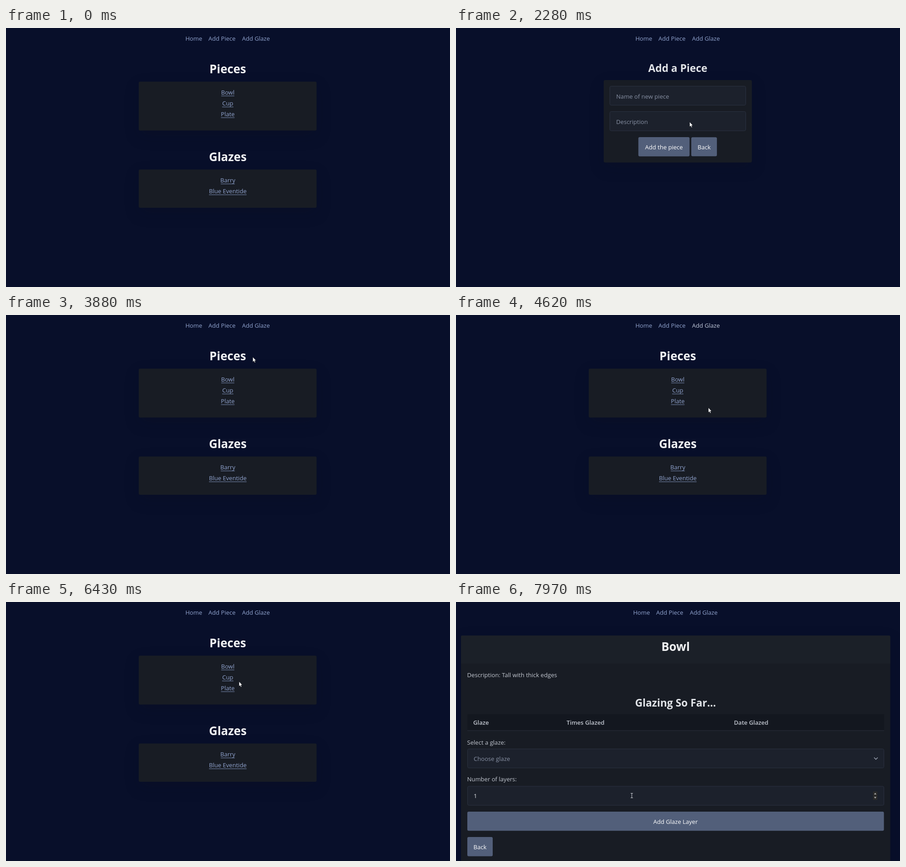
An HTML page that plays this animation: 980x572 px, repeating every 8 s.

```html
<!DOCTYPE html>
<html lang="en">
<head>
<meta charset="utf-8">
<title>Glaze tracker</title>
<style>
html, body { margin: 0; width: 100%; height: 100%; overflow: hidden; background: #080f2a; }
svg { display: block; width: 980px; height: 572px; }
text { font: 13.1px "Open Sans", "Noto Sans", sans-serif; fill: #c2c7d0; }
.mid text, text.mid { text-anchor: middle; }
.link { fill: #91a4cf; transition: fill .15s; }
.link.lit { fill: #c3cbdd; }
.u { stroke: #7f91ba; }
.u.lit { stroke: #c3cbdd; }
text.h1 { font-size: 25.9px; font-weight: 700; fill: #f0f1f3; }
text.h2 { font-size: 22.9px; font-weight: 700; fill: #e0e3e7; }
text.th { font-weight: 600; }
text.hint { fill: #8891a4; }
text.value { fill: #e0e3e7; }
text.on { fill: #fff; }
.card { fill: #181c24; filter: drop-shadow(0 12px 16px rgba(4, 6, 12, .13)); }
.field { fill: #1c212c; stroke: #2a3140; }
.btn { fill: #525f7a; transition: fill .15s; }
.btn.lit { fill: #5d6b89; }
.ring { fill: none; stroke: #3d4658; stroke-width: 2; }
</style>
</head>
<body>
<svg viewBox="0 0 980 572">
  <g id="nav" class="mid">
    <text class="link" x="414.5" y="27.5">Home</text>
    <text class="link" id="navPiece" x="476.7" y="27.5">Add Piece</text>
    <text class="link" id="navGlaze" x="551.6" y="27.5">Add Glaze</text>
    <path class="u lit" id="linePiece" d="M447 30.5H507"/>
    <path class="u lit" id="lineGlaze" d="M521 30.5H582.5"/>
  </g>

  <g id="home" class="mid">
    <text class="h1" x="489.5" y="100">Pieces</text>
    <rect class="card" x="293" y="118.5" width="392.5" height="108" rx="3"/>
    <text class="link" id="bowl" x="489.5" y="146.8">Bowl</text>
    <text class="link" x="489.5" y="171">Cup</text>
    <text class="link" x="489.5" y="194.8">Plate</text>
    <path class="u" id="bowlLine" d="M475 150H504"/>
    <path class="u" d="M477 174.3H502M474.5 198H504.5"/>
    <text class="h1" x="489.5" y="294">Glazes</text>
    <rect class="card" x="293" y="312.5" width="392.5" height="84.5" rx="3"/>
    <text class="link" x="489.5" y="341.3">Barry</text>
    <text class="link" x="489.5" y="365.3">Blue Eventide</text>
    <path class="u" d="M474 344.3H505M448 368.3H531"/>
  </g>

  <g id="form">
    <text class="h2 mid" x="489.5" y="97">Add a <tspan id="title">Piece</tspan></text>
    <rect class="card" x="326" y="115" width="327" height="182" rx="3"/>
    <rect class="field" x="339.5" y="128.5" width="300" height="42" rx="3"/>
    <text class="hint" x="353.5" y="155.5">Name of new <tspan class="word">piece</tspan></text>
    <rect class="field" x="339.5" y="184.5" width="300" height="42.5" rx="3"/>
    <text class="hint" x="353.5" y="211.5">Description</text>
    <rect class="btn" x="402.5" y="241" width="113" height="42.5" rx="3"/>
    <text class="on mid" x="459" y="268">Add the <tspan class="word">piece</tspan></text>
    <rect class="ring" id="ring" x="518.8" y="240.8" width="57.6" height="43" rx="3"/>
    <rect class="btn" id="back" x="519.3" y="241.3" width="56.6" height="42" rx="3"/>
    <text class="on mid" x="547.7" y="268">Back</text>
  </g>

  <g id="detail">
    <rect class="card" x="11" y="74" width="947.5" height="510" rx="3"/>
    <path fill="#1b2028" d="M11 136V77q0-3 3-3H955.5q3 0 3 3V136z"/>
    <text class="h1 mid" x="484.7" y="108">Bowl</text>
    <text x="24.5" y="166">Description: Tall with thick edges</text>
    <text class="h2 mid" x="484.5" y="231">Glazing So Far...</text>
    <rect fill="#13171f" x="25" y="248" width="920" height="36"/>
    <path stroke="#2a303c" d="M25 284H945"/>
    <text class="th" x="38" y="271">Glaze</text>
    <text class="th" x="244" y="271">Times Glazed</text>
    <text class="th" x="613.5" y="271">Date Glazed</text>
    <text x="24.5" y="314.5">Select a glaze:</text>
    <rect class="field" x="25.5" y="324.5" width="919" height="42" rx="3"/>
    <text class="hint" x="39" y="351">Choose glaze</text>
    <path fill="none" stroke="#a4acba" stroke-width="1.3" d="M922.8 343.5l4 4 4-4"/>
    <text x="24.5" y="396">Number of layers:</text>
    <rect class="field" x="25.5" y="407" width="919" height="42" rx="3"/>
    <text class="value" x="39" y="433">1</text>
    <rect fill="#2b2b2b" x="920.5" y="418.5" width="9.5" height="18.5"/>
    <path fill="#b4b4b4" d="M922.8 425l2.5-3.5 2.5 3.5zM922.8 430.5l2.5 3.5 2.5-3.5z"/>
    <rect class="btn" x="25" y="463" width="919.5" height="42.3" rx="3"/>
    <text class="on mid" x="484.5" y="489.5">Add Glaze Layer</text>
    <rect class="btn" x="25" y="519" width="56" height="42.5" rx="3"/>
    <text class="on mid" x="53" y="546">Back</text>
  </g>

  <g id="cursor">
    <path id="arrow" fill="#fff" stroke="#05070d" stroke-width=".7"
      d="M0 0V11L2.4 8.8L4.1 12.6L5.9 11.8L4.3 8.1H7.5z"/>
    <path id="hand" fill="#fff" stroke="#05070d" stroke-width=".7"
      d="M-1.3 1Q0-1 1.3 1V5.5Q2.8 4.5 3.5 6Q5 5.3 5.4 6.8Q6.6 6.5 6.6 8V11Q6.6 13 5 15H-1.2L-4.6 9.8Q-5 8-3.2 8.3L-1.3 10z"/>
    <path id="beam" fill="none" stroke="#d5d8de" d="M-2.5-4.5H2.5M0-4.5V5.5M-2.5 5.5H2.5"/>
  </g>
</svg>
<script>
const LOOP = 8000, STEP = 200 / 3;
const $ = id => document.getElementById(id);

// time, x, y of the pointer's hot spot
const path = [
  [130, 787, 530], [200, 630, 425], [266, 430, 300], [333, 334, 240], [400, 366, 209],
  [580, 366, 209], [1333, 480, 18], [1780, 480, 18], [2600, 540, 337], [2650, 540, 337],
  [3130, 545, 262], [3300, 545, 262], [3400, 533.5, 223.5], [4130, 551, 19], [4200, 551, 19],
  [4600, 557, 204.5], [5000, 546, 264], [5600, 546, 263], [5930, 531, 49], [6400, 514.3, 175.5],
  [6540, 514.3, 175.5], [7000, 496, 140], [7200, 496, 140], [7400, 515, 158.5], [7930, 388, 427]
];
const pages = [
  [0, "home"], [2150, "form", "Piece"], [3480, "home"],
  [4690, "form", "Glaze"], [5760, "home"], [7500, "detail"]
];
const handTimes = [[1270, 1830], [2950, 3340], [4080, 4240], [4990, 5650], [6900, 7270]];

const within = (t, ...spans) => spans.some(([a, b]) => t >= a && t < b);
const show = (id, on) => { $(id).style.display = on ? "" : "none"; };
const lit = (id, on) => $(id).classList.toggle("lit", on);

function pointAt(t) {
  const i = path.findIndex(p => p[0] > t);
  if (i < 0) return path[path.length - 1].slice(1);
  if (i === 0) return path[0].slice(1);
  const [t0, x0, y0] = path[i - 1], [t1, x1, y1] = path[i];
  const k = (t - t0) / (t1 - t0);
  return [x0 + (x1 - x0) * k, y0 + (y1 - y0) * k];
}

function drawPage(t) {
  const [, name, word] = pages.filter(p => p[0] <= t).pop();
  for (const id of ["home", "form", "detail"]) show(id, id === name);
  $("nav").setAttribute("transform", `translate(${name === "detail" ? -5 : 0} 0)`);
  if (word) {
    $("title").textContent = word;
    document.querySelectorAll(".word").forEach(w => { w.textContent = word.toLowerCase(); });
  }
}

function drawHover(t) {
  lit("navPiece", within(t, [1270, 2150]));
  show("linePiece", within(t, [1270, 1860]));
  lit("navGlaze", within(t, [4080, 4690]));
  show("lineGlaze", within(t, [4080, 4280]));
  lit("back", within(t, [2950, 3480], [5000, 5760]));
  show("ring", within(t, [3130, 3480], [5290, 5760]));
  const onBowl = within(t, [6900, 7500]);
  lit("bowl", onBowl);
  lit("bowlLine", onBowl);
}

function drawCursor(t) {
  const hand = within(t, ...handTimes), beam = t >= 7700;
  // the pointer advances at 15 steps a second
  const [x, y] = pointAt(Math.floor((t + 10) / STEP) * STEP);
  $("cursor").setAttribute("transform", `translate(${x} ${y})`);
  show("cursor", t >= 130);
  show("hand", hand);
  show("beam", beam);
  show("arrow", !hand && !beam);
}

const start = performance.now();
function frame() {
  const t = (performance.now() - start) % LOOP;
  drawPage(t);
  drawHover(t);
  drawCursor(t);
  requestAnimationFrame(frame);
}
frame();
</script>
</body>
</html>
```
